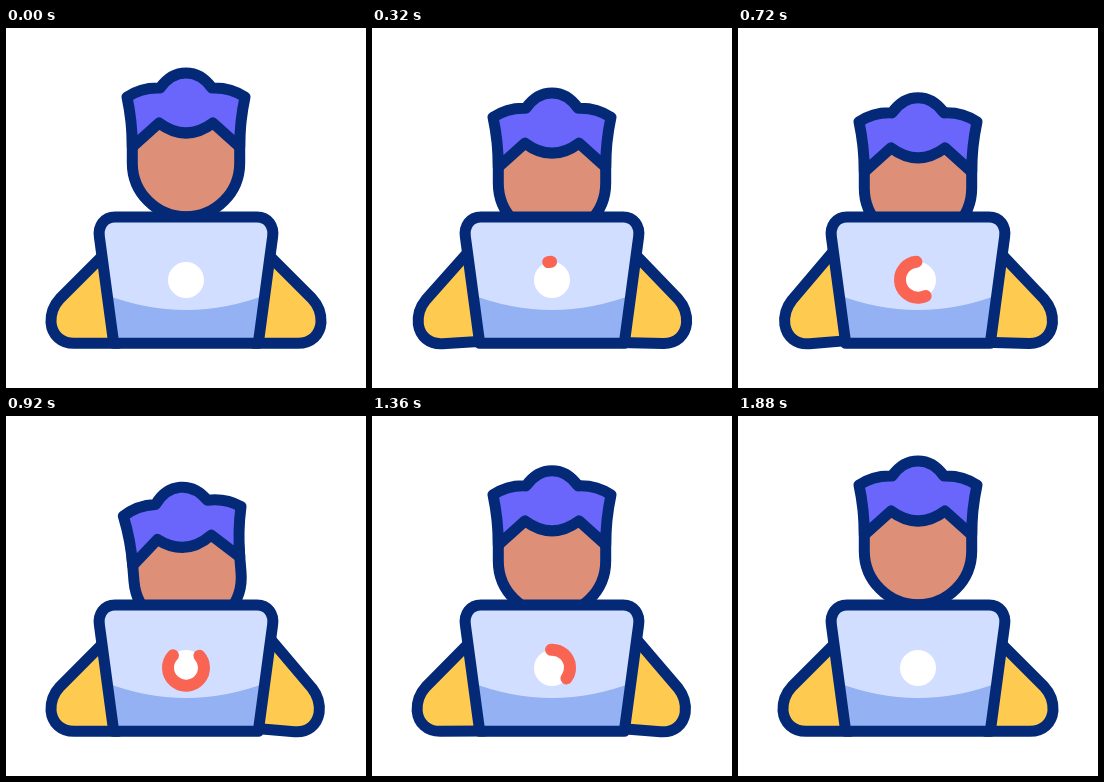
Animation of 360x360 px, one loop 2000 ms. Source, as an HTML page:

```html
<!DOCTYPE html>
<html lang="en">
<head>
<meta charset="utf-8">
<title>Person at a laptop</title>
<style>
  html, body { margin: 0; width: 100%; height: 100%; overflow: hidden; background: #fff; }
  svg { display: block; width: 100vw; height: 100vh; }
  .line { stroke: #042a77; stroke-width: 11; stroke-linecap: round; stroke-linejoin: round; }
</style>
</head>
<body>
<svg viewBox="0 0 360 360">
  <defs>
    <path id="arm" class="line" fill="#ffca50"
      d="M108 216.5 L54 270.5 C47 278 44.7 286 45 294.5 C46 307 55 315.3 68 315.3 H112"/>
    <path id="lid" d="M107.7 315.3 L93.4 209 C91.8 198 98 189 109 189 H251 C262 189 268.2 198 266.6 209 L252.3 315.3 Z"/>
    <clipPath id="lidClip"><use href="#lid"/></clipPath>
  </defs>

  <g id="head">
    <path class="line" fill="#dd8f78" d="M126.3 100 V135 A53.7 53.7 0 0 0 233.7 135 V100"/>
    <path class="line" fill="#6a66fb"
      d="M121 69 C130 63 142 59.5 154 60 C161 50 170 44.9 180 44.9 S199 50 206 60
         C218 59.5 230 63 239 69 C234.5 90 233.7 105 233.7 119 L207 95 Q180 115 153 95
         L126.3 119 C126.3 105 125.5 90 121 69 Z"/>
  </g>

  <g id="leftArm"><use href="#arm"/></g>
  <g transform="translate(360 0) scale(-1 1)"><g id="rightArm"><use href="#arm"/></g></g>

  <use href="#lid" fill="#d1deff"/>
  <path clip-path="url(#lidClip)" fill="#93b1f3" d="M98 266 Q180 298 262 266 V320 H98 Z"/>
  <use href="#lid" class="line" fill="none"/>
  <circle cx="180" cy="252" r="18" fill="#fff"/>
  <circle id="ring" r="18" pathLength="360" fill="none" stroke="#f96453" stroke-width="12"
    stroke-linecap="round" transform="translate(180 251.7) rotate(-93) scale(1 -1)"/>
</svg>
<script>
const LOOP = 2000, STEP = 40, TYPING = 467;
const [head, leftArm, rightArm, ring] =
  ["head", "leftArm", "rightArm", "ring"].map(id => document.getElementById(id));

const progress = (t, from, to) => Math.min(1, Math.max(0, (t - from) / (to - from)));
const easeOut = (t, from, to) => 1 - (1 - progress(t, from, to)) ** 3;
const easeInOut = (t, from, to) => {
  const x = progress(t, from, to);
  return x * x * (3 - 2 * x);
};
const wave = x => Math.sin(2 * Math.PI * x);

function moveHead(t) {
  const duck = easeOut(t, 40, 660) - easeOut(t, 1180, 1880);
  const lean = easeInOut(t, 600, 900) - easeInOut(t, 1160, 1360);
  const tilt = -4.8 * wave(progress(t, 740, 1360));
  head.setAttribute("transform",
    `translate(0 ${24.2 * duck + 2 * lean}) rotate(${tilt} 180 116)`);
}

function liftArm(arm, amount) {
  arm.setAttribute("transform", `rotate(${-4.8 * amount} 75 273)`);
}

function moveArms(t) {
  const beat = Math.cos(2 * Math.PI * t / TYPING);
  const active = easeInOut(t, 200, 460) - easeInOut(t, 1400, 1860);
  liftArm(leftArm, t < 4 * TYPING ? (1 - beat) / 2 : 0);
  liftArm(rightArm, active * (0.65 + 0.35 * beat));
}

function drawRing(t) {
  const start = 360 * easeInOut(t, 667, 1833);
  const length = 360 * easeInOut(t, 233, 1133) - start;
  ring.setAttribute("visibility", length > 0.5 ? "visible" : "hidden");
  ring.setAttribute("stroke-dasharray", `${length} 360`);
  ring.setAttribute("stroke-dashoffset", -start);
}

function render(time) {
  const t = Math.floor(time % LOOP / STEP) * STEP;
  moveHead(t);
  moveArms(t);
  drawRing(t);
}

const origin = performance.now();
function tick() {
  render(performance.now() - origin);
  requestAnimationFrame(tick);
}
tick();
</script>
</body>
</html>
```
